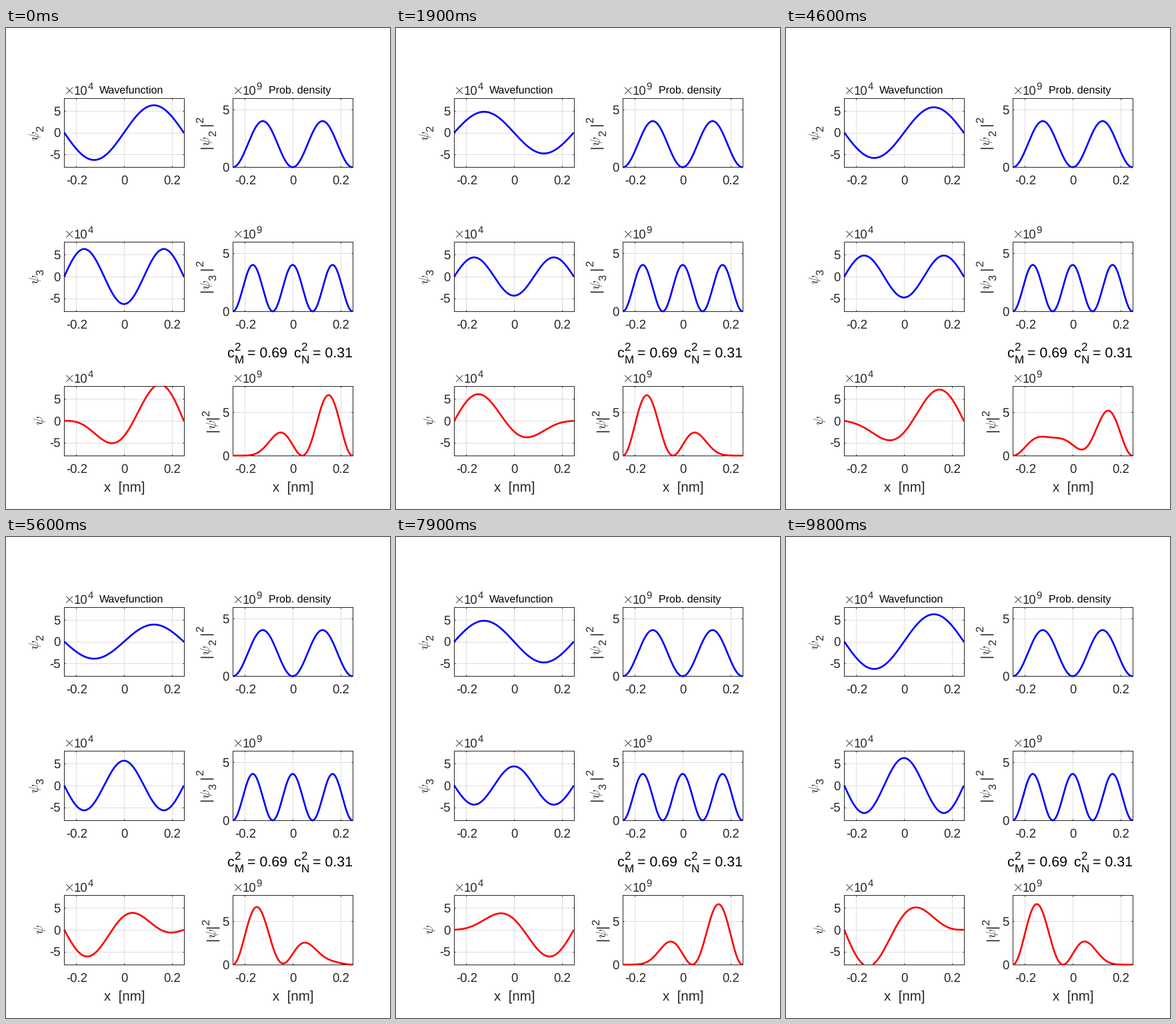
Recreate the animation shown at these times as a matplotlib script. Size 576 by 720 pixels, loop 9900 ms.

```python
import numpy as np
import matplotlib.pyplot as plt
from matplotlib.animation import FuncAnimation

W, H, DPI = 576, 720, 96
FRAMES, INTERVAL = 99, 100

DARK = (0.15, 0.15, 0.15)
# panel edges in px, vertical ones counted from the top
COLS = (87.3, 340.3)
BOTTOMS = (640.1, 424.1, 208.4)
TOPS = (535.9, 319.9, 104.8)
BOX_W = 179.4
AMP_LIM = 8e4
TICK, LABEL, TITLE, SUM = 14, 15.4, 12, 16
SMALL = 0.8                      # size of sub- and superscripts

plt.rcParams["font.family"] = "Liberation Sans"
plt.rcParams["text.hinting"] = "none"
fig = plt.figure(figsize=(W / DPI, H / DPI), dpi=DPI, facecolor="white")

# Infinite well of width L (nm) holding a mix of states 2 and 3
L = 0.5
x = np.linspace(-L / 2, L / 2, 401)
amp = np.sqrt(2 / (L * 1e-9))
psi2 = amp * np.sin(2 * np.pi * x / L)
psi3 = -amp * np.cos(3 * np.pi * x / L)
c2, c3 = 3 / np.sqrt(13), 2 / np.sqrt(13)


def write(px, py, s, size, color=DARK, **kw):
    """Put text with its baseline at a pixel position."""
    return fig.text(px / W, 1 - py / H, s, fontsize=size, color=color,
                    va="baseline", math_fontfamily="cm", **kw)


def write_up(px, py, s, size=LABEL):
    write(px, py, s, size, rotation=90, rotation_mode="anchor", ha="left")


def panel(left, bottom, top, ylim, yticks, unit, power):
    height = bottom - top
    ax = fig.add_axes([left / W, 1 - bottom / H, BOX_W / W, height / H])
    ax.set(xlim=(-L / 2, L / 2), ylim=ylim,
           xticks=(-0.2, 0, 0.2), yticks=[v * unit for v in yticks])
    ax.set_axisbelow(True)
    ax.grid(color="0.87", lw=0.75)
    ax.tick_params(direction="in", length=1.3, width=0.75, color=DARK,
                   top=True, right=True, labelbottom=False, labelleft=False)
    ax.yaxis.get_offset_text().set_visible(False)
    for spine in ax.spines.values():
        spine.set(color=DARK, lw=0.75)

    for v in (-0.2, 0, 0.2):
        px = left + (v / L + 0.5) * BOX_W
        write(px + 0.8, bottom + 25.7, f"{v:g}", TICK, ha="center")
    for v in yticks:
        py = bottom - (v * unit - ylim[0]) / (ylim[1] - ylim[0]) * height
        write(left - 5.5, py + 6.7, f"{v:g}", TICK, ha="right")

    write(left - 1.1, top - 5.3, r"$\times$", 16)
    write(left + 14.7, top - 4.8, "10", TICK)
    write(left + 35.3, top - 12.8, power, TICK * SMALL)
    return ax


def curve(ax, y, color):
    line, = ax.plot(x, y, color=color, lw=2, zorder=3, clip_on=False,
                    solid_capstyle="butt", solid_joinstyle="round")
    return line


def clipped(y):
    return np.where(np.abs(y) <= AMP_LIM, y, np.nan)


def wave_label(mid, sub):
    if sub:
        write_up(49, mid + 12, r"$\psi$")
        write_up(56, mid - 2, sub, LABEL * SMALL)
    else:
        write_up(55.5, mid + 6.8, r"$\psi$")


def density_label(mid, sub):
    base = 305.5 if sub else 314.5
    py = mid + (24.2 if sub else 16.6)
    write_up(base, py, "|")
    write_up(base, py - 3.7, r"$\psi$")
    py -= 18.7
    if sub:
        write_up(base + 10, py, sub, LABEL * SMALL)
        py -= 14.8
    write_up(base, py, "|")
    write_up(base - 9.5, py - 5.3, "2", LABEL * SMALL)


def coefficient(px, name, value, gap):
    write(px, 493, "c", SUM, "black")
    write(px + 11, 483, "2", SUM * SMALL, "black")
    write(px + 11, 502, name, SUM * SMALL, "black")
    write(px + gap, 493, f"= {value:.2f}", SUM, "black")


waves, densities = [], []
rows = (("", 8e9, "red"), ("3", 6e9, "blue"), ("2", 6e9, "blue"))
for bottom, top, (sub, dens_lim, color) in zip(BOTTOMS, TOPS, rows):
    left_ax = panel(COLS[0], bottom, top, (-AMP_LIM, AMP_LIM),
                    (-5, 0, 5), 1e4, "4")
    right_ax = panel(COLS[1], bottom, top, (0, dens_lim), (0, 5), 1e9, "9")
    waves.append(curve(left_ax, 0 * x, color))
    densities.append(curve(right_ax, 0 * x, color))
    mid = (bottom + top) / 2
    wave_label(mid, sub)
    density_label(mid, sub)

densities[1].set_ydata(psi3 ** 2)
densities[2].set_ydata(psi2 ** 2)

write(139.9, 98, "Wavefunction", TITLE, "black")
write(394.2, 98, "Prob. density", TITLE, "black")
for left in COLS:
    write(left + BOX_W / 2 + 1, 694, "x  [nm]", LABEL, ha="center")
coefficient(331.3, "M", c2 ** 2, 30.7)
coefficient(431.3, "N", c3 ** 2, 28.9)


def update(k):
    # energies scale as n squared, so the phases run 4 : 9
    turn = np.pi * k / (FRAMES - 1)
    part2 = psi2 * np.exp(-4j * turn)
    part3 = psi3 * np.exp(-9j * turn)
    total = c2 * part2 + c3 * part3
    for line, y in zip(waves, (total, part3, part2)):
        line.set_ydata(clipped(y.real))
    densities[0].set_ydata(np.abs(total) ** 2)
    return [*waves, densities[0]]


anim = FuncAnimation(fig, update, frames=FRAMES, interval=INTERVAL,
                     repeat=True, repeat_delay=0)
plt.show()
```
